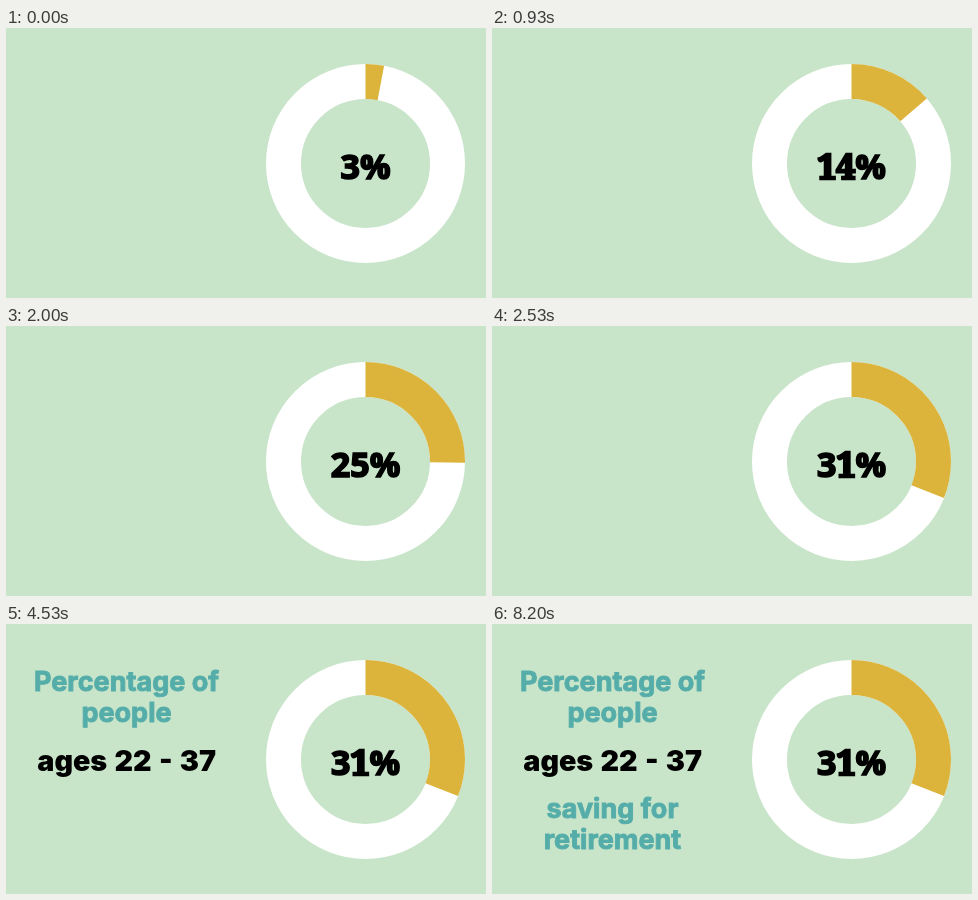
An HTML page that plays this animation: 480x270 px, repeating every 9.54 s.

```html
<!DOCTYPE html>
<html lang="en">
<head>
<meta charset="utf-8">
<title>Saving for retirement</title>
<style>
  html, body { margin: 0; width: 100%; height: 100%; overflow: hidden; background: #c8e4c9; }
  svg { display: block; width: 480px; height: 270px; }
  text { text-anchor: middle; }
  .label { font: 700 27px Inter, sans-serif; fill: #55ada9; stroke: #55ada9; stroke-width: .9px; }
  .ages { font: 900 28.7px Inter, sans-serif; word-spacing: 1.6px; }
  #percent { font: 900 34px "Noto Sans", sans-serif; stroke: #000; stroke-width: 1.7px; }
  .slab { font-family: "Noto Serif", serif; stroke-width: 2.6px; }
  circle { fill: none; stroke-width: 35; }
</style>
</head>
<body>
<svg viewBox="0 0 480 270">
  <g transform="translate(359.5 135.5)">
    <circle r="82" stroke="#fff"/>
    <circle id="arc" r="82" stroke="#dcb43b" pathLength="100" transform="rotate(-90)"/>
    <text id="percent" y="15.3"></text>
  </g>
  <g class="label" data-from="3130">
    <text x="120.5" y="67">Percentage of</text>
    <text x="120.5" y="98">people</text>
  </g>
  <text class="ages" data-from="4530" x="120.7" y="147">ages 22 - 37</text>
  <g class="label" data-from="6200">
    <text x="120.5" y="194">saving for</text>
    <text x="120.5" y="225">retirement</text>
  </g>
</svg>
<script>
const LOOP = 9540, STEP = 1000 / 15;
const keys = [[0, 3], [933, 13.65], [1533, 20.1], [2533, 31]];
const arc = document.getElementById('arc');
const percent = document.getElementById('percent');
const captions = document.querySelectorAll('[data-from]');

function valueAt(t) {
  const i = keys.findIndex(([time]) => time > t);
  if (i < 0) return 31;
  const [t0, v0] = keys[i - 1], [t1, v1] = keys[i];
  return v0 + (v1 - v0) * (t - t0) / (t1 - t0);
}

// The digits 1 and 4 carry slab serifs.
const numeral = n => `${n}%`.replace(/[14]/g, '<tspan class="slab">$&</tspan>');

let shown;
function draw(now) {
  const t = now % LOOP;
  const step = Math.floor((t + 4) / STEP);
  const value = valueAt(step < 2 ? 0 : step * STEP);
  const n = Math.round(value);
  arc.setAttribute('stroke-dasharray', `${value} 100`);
  if (n !== shown) percent.innerHTML = numeral(shown = n);
  for (const c of captions) c.style.visibility = t >= c.dataset.from ? 'visible' : 'hidden';
}

const start = performance.now();
function tick() {
  draw(performance.now() - start);
  requestAnimationFrame(tick);
}
tick();
</script>
</body>
</html>
```
